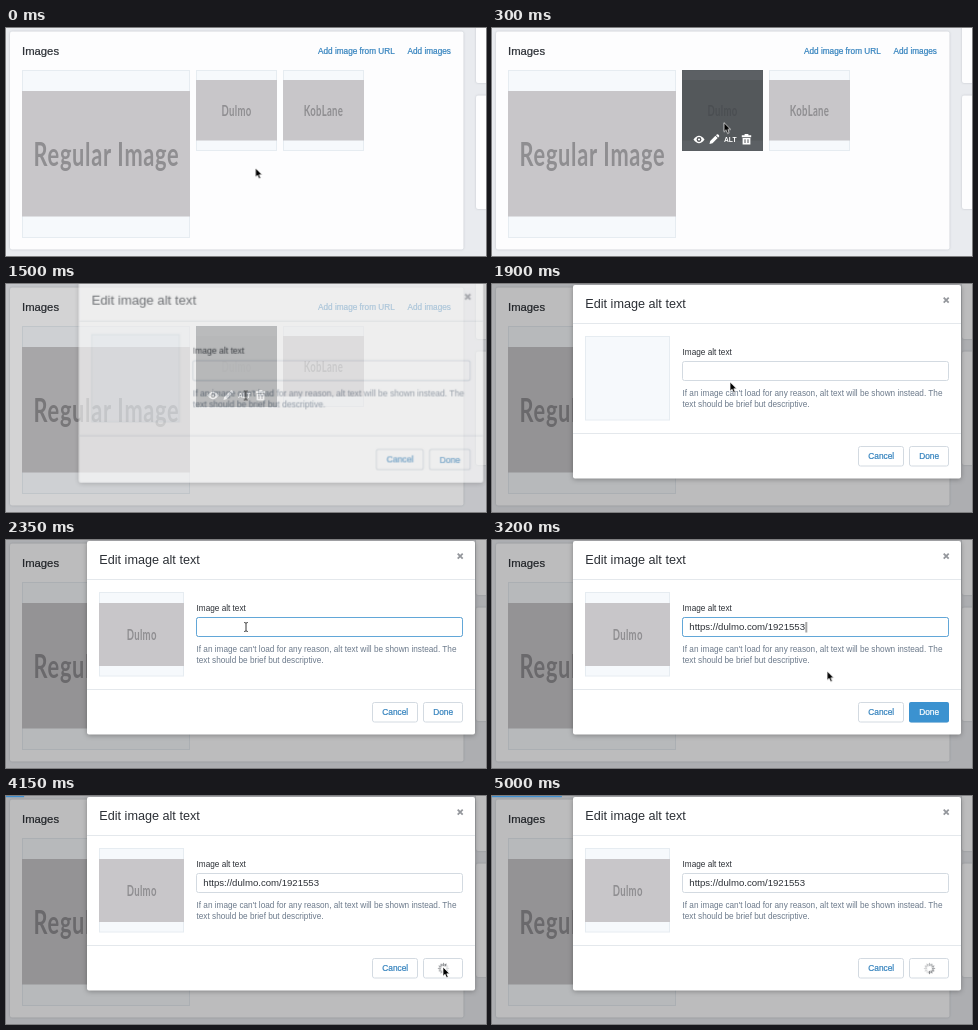
Recreate the animation shown at these times as an HTML page. Size 480 by 228 pixels, loop 5050 ms.

```html
<!DOCTYPE html>
<html lang="en">
<head>
<meta charset="utf-8">
<title>Edit image alt text</title>
<style>
html, body { margin: 0; width: 100%; height: 100%; overflow: hidden; background: #e9ebef; }
svg { display: block; width: 100vw; height: 100vh; }
text { font: 8.23px "Liberation Sans", Arial, sans-serif; fill: #2c3036; }
.link { fill: #3583be; color: #3583be; }
.medium { stroke: currentColor; stroke-width: .22px; }
.card { fill: #fdfdfe; filter: drop-shadow(0 .6px .8px rgba(40, 50, 65, .2)); }
.frame { fill: #f6f9fc; stroke: #e6ecf1; }
.photo { fill: #c8c6c9; }
.sign { font: 700 33px Lato, sans-serif; letter-spacing: .033em; fill: #8f8e91; text-anchor: middle; }
.small { font-size: 14.5px; }
.line { stroke: #e4e8ec; }
.button { fill: #fff; stroke: #d3dae1; }
.action { font-size: 8.3px; }
.help { fill: #6c7a8b; }
.value { font-size: 9.6px; }
.white { fill: #fff; color: #fff; }

/* One shared 5050 ms clock; percentages are ms / 50.5. */
.anim { animation: 5050ms linear infinite; }
.cut { animation: 5050ms step-end infinite; }

#shade { animation-name: shade; }
@keyframes shade { 0%, 2.97% { opacity: 0 } 5.94%, 100% { opacity: 1 } }
#tip { animation-name: tip; }
@keyframes tip { 0%, 14.85% { opacity: 0 } 16.83%, 25.74% { opacity: 1 } 27.72%, 100% { opacity: 0 } }

#dim { animation-name: dim; }
@keyframes dim {
  0% { opacity: 0 }
  27.32% { opacity: 0; animation-timing-function: cubic-bezier(.25, .46, .45, .94) }
  33.66%, 100% { opacity: 1 }
}
#modal { transform-origin: 275px 97.5px; animation-name: modal; }
@keyframes modal {
  0% { opacity: 0; transform: scale(1.11) }
  27.52% { opacity: 0; transform: scale(1.11); animation-timing-function: cubic-bezier(.25, .46, .45, .94) }
  33.66%, 100% { opacity: 1; transform: none }
}
#thumb { animation-name: thumb; }
@keyframes thumb { 0% { opacity: 0 } 38.61%, 100% { opacity: 1 } }
#focus { animation-name: focus; }
@keyframes focus { 0% { opacity: 0 } 40.59% { opacity: 1 } 80.19%, 100% { opacity: 0 } }
#typed { animation-name: typed; }
@keyframes typed { 0% { opacity: 0 } 56.43%, 100% { opacity: 1 } }
#caret { animation-name: caret; }
@keyframes caret {
  0% { opacity: 0; transform: translateX(198px) }
  40.59% { opacity: 1; transform: translateX(198px) }
  45.54% { opacity: 0; transform: translateX(198px) }
  55.44% { opacity: 1; transform: translateX(198px) }
  56.43% { opacity: 1; transform: translateX(314.3px) }
  66.33% { opacity: 0; transform: translateX(314.3px) }
  76.23% { opacity: 1; transform: translateX(314.3px) }
  80.19%, 100% { opacity: 0; transform: translateX(314.3px) }
}
#ready { animation-name: ready; }
@keyframes ready { 0% { opacity: 0 } 56.43% { opacity: 1 } 80.19%, 100% { opacity: 0 } }
#done { animation-name: done; }
@keyframes done { 0% { opacity: 1 } 56.43%, 100% { opacity: 0 } }
#busy { animation-name: busy; }
@keyframes busy { 0% { opacity: 0 } 80.19%, 100% { opacity: 1 } }
#spin { transform-origin: 0 0; animation-name: spin; }
@keyframes spin {
  0% { transform: none }
  80.19% { transform: rotate(0deg); animation-timing-function: steps(20) }
  100% { transform: rotate(600deg) }
}
#bar { animation-name: bar; }
@keyframes bar {
  0%, 80.19% { transform: scaleX(0) }
  82.17% { transform: scaleX(18) }
  89.1% { transform: scaleX(48) }
  100% { transform: scaleX(72) }
}

#cursor { animation-name: move; }
@keyframes move {
  0%, .99% { transform: translate(249.5px, 140px); animation-timing-function: ease-in-out }
  6.93% { transform: translate(231px, 92px) }
  11.88% { transform: translate(231px, 92px); animation-timing-function: ease-in-out }
  16.83%, 24.75% { transform: translate(240.7px, 109px) }
  29.7%, 35.64% { transform: translate(239.7px, 111.5px) }
  37.62% { transform: translate(238px, 98px) }
  40.59%, 57.43% { transform: translate(240px, 87px) }
  63.37% { transform: translate(335px, 131px) }
  65.35% { transform: translate(352px, 139px) }
  66.34% { transform: translate(352px, 139px); animation-timing-function: ease-out }
  71.29%, 84.16% { transform: translate(437px, 171px) }
  87.13%, 100% { transform: translate(441px, 179px) }
}
#arrow { animation-name: arrow; }
@keyframes arrow {
  0% { opacity: 1 } 13.86% { opacity: 0 }
  35.64% { opacity: 1 } 39.6% { opacity: 0 }
  59.4% { opacity: 1 } 71.28% { opacity: 0 }
  81.18% { opacity: 1 } 88.11%, 100% { opacity: 0 }
}
#hand { animation-name: hand; }
@keyframes hand {
  0% { opacity: 0 } 13.86% { opacity: 1 } 28.71% { opacity: 0 }
  71.28% { opacity: 1 } 81.18%, 100% { opacity: 0 }
}
#beam { animation-name: beam; }
@keyframes beam {
  0% { opacity: 0 } 28.71% { opacity: 1 } 35.64% { opacity: 0 }
  39.6% { opacity: 1 } 59.4%, 100% { opacity: 0 }
}
</style>
</head>
<body>
<svg viewBox="0 0 480 228">
  <rect width="480" height="228" fill="#e9ebef"/>
  <rect class="card" x="4" y="3.5" width="453.5" height="218" rx="2"/>
  <rect class="card" x="470" y="-10" width="30" height="65" rx="2"/>
  <rect class="card" x="470" y="67.5" width="30" height="113.5" rx="2"/>

  <text class="medium" x="16" y="27" color="#2c3036" style="font-size:11.3px">Images</text>
  <text class="link medium" x="312" y="26">Add image from URL</text>
  <text class="link medium" x="401.5" y="26">Add images</text>

  <rect class="frame" x="16.5" y="42.5" width="167" height="167"/>
  <rect class="photo" x="16" y="63" width="168" height="125.5"/>
  <text class="sign" transform="translate(100.5 138) scale(.66 1)">Regular Image</text>

  <rect class="frame" x="190.5" y="42.5" width="80" height="80"/>
  <rect class="photo" x="190" y="52" width="81" height="60.5"/>
  <text class="sign small" transform="translate(230.5 88) scale(.66 1)">Dulmo</text>

  <rect class="frame" x="277.5" y="42.5" width="80" height="80"/>
  <rect class="photo" x="277" y="52" width="81" height="60.5"/>
  <text class="sign small" transform="translate(317.5 88) scale(.66 1)">KobLane</text>

  <g id="shade" class="anim">
    <rect x="190" y="42" width="81" height="81" fill="#3d4145" fill-opacity=".83"/>
    <g fill="#fff">
      <path d="M201.5 111.5Q207 104 212.5 111.5Q207 119 201.5 111.5Z"/>
      <circle cx="207" cy="111.5" r="2.4" fill="#55575b"/>
      <circle cx="207" cy="111.5" r="1.1"/>
      <path d="M217.5 116L218.2 113L223.4 107.8L225.7 110.1L220.5 115.3ZM224 107.2L225 106.3Q225.8 106 226.6 106.8T227.2 108.5L226.3 109.5Z"/>
      <text class="white" x="232" y="114" style="font-weight:700;font-size:6.7px">ALT</text>
      <path d="M249.8 107.2H252.6V106H256.4V107.2H259.2V109.2H249.8ZM250.6 110H258.4V116.5H250.6Z"/>
      <path d="M253 111.3V115M256 111.3V115" stroke="#55575b"/>
    </g>
  </g>
  <g id="tip" class="anim">
    <path d="M216 81.5H260.5Q263 81.5 263 84V95Q263 97.5 260.5 97.5H241.5L238.5 100.5L235.5 97.5H216Q213.5 97.5 213.5 95V84Q213.5 81.5 216 81.5Z" fill="#1f2124"/>
    <text class="white medium" x="219" y="92" style="font-size:7.75px">Edit alt text</text>
  </g>

  <rect id="dim" class="anim" width="480" height="228" fill="rgba(0,0,0,.26)"/>

  <g id="modal" class="anim">
    <rect x="81" y="1" width="388" height="193.5" rx="2" fill="#fff" style="filter:drop-shadow(0 1px 2.5px rgba(0,0,0,.3))"/>
    <path class="line" d="M81 39.5H469M81 149.5H469"/>
    <text x="93.3" y="24" style="font-size:12.65px">Edit image alt text</text>
    <path d="M451.7 13.7L456.7 18.7M456.7 13.7L451.7 18.7" stroke="#94979c" stroke-width="1.8"/>

    <rect class="frame" x="93.5" y="52.5" width="84" height="83.5"/>
    <g id="thumb" class="cut">
      <rect class="photo" x="93" y="63" width="85" height="63"/>
      <text class="sign small" transform="translate(135.7 100) scale(.66 1)">Dulmo</text>
    </g>

    <text x="190.5" y="71">Image alt text</text>
    <rect class="button" x="190.5" y="77.5" width="266" height="19" rx="2"/>
    <rect id="focus" class="cut" x="190.5" y="77.5" width="266" height="19" rx="2" fill="none" stroke="#62a7d8"/>
    <text id="typed" class="value cut" x="197.3" y="90.3">https://dulmo.com/1921553</text>
    <path id="caret" class="cut" d="M0 82V92.5" stroke="#222" stroke-width=".8"/>
    <text class="help" x="190.5" y="111.7">If an image can't load for any reason, alt text will be shown instead. The</text>
    <text class="help" x="190.5" y="122.7">text should be brief but descriptive.</text>

    <rect class="button" x="366.5" y="162.5" width="45" height="19.5" rx="2"/>
    <text class="link medium action" x="376.3" y="175.4">Cancel</text>
    <rect class="button" x="417.5" y="162.5" width="39" height="19.5" rx="2"/>
    <text id="done" class="link medium action cut" x="427.2" y="175.4">Done</text>
    <g id="ready" class="cut">
      <rect x="417" y="162" width="40" height="20.5" rx="2" fill="#3b92d0"/>
      <text class="white medium action" x="427.2" y="175.4">Done</text>
    </g>
    <g id="busy" class="cut">
      <g transform="translate(437.5 172.5)"><g id="spin" class="anim"></g></g>
    </g>
  </g>

  <rect id="bar" class="anim" width="1" height="1.2" fill="#3f8fd0"/>

  <g id="cursor" class="anim">
    <path id="arrow" class="cut" d="M0 0V9.2L2.1 7.3L3.6 10.8L5.2 10.1L3.8 6.8H6.6Z" stroke="#fff" stroke-width=".7"/>
    <path id="hand" class="cut" d="M-.9 .5C-.9 -.8 .9 -.8 .9 .5V4.2C2 3.6 3 4 3 4.6C4 4.2 4.8 4.6 4.9 5.2C6 5 6.3 5.6 6.3 6.2V8.5C6.3 9.5 5.5 10 5.5 11H-.2C-.3 10-2 9-2.8 7.2C-3.4 5.9-2 5.4-.9 7Z" fill="#fff" stroke="#111" stroke-width=".8"/>
    <path id="beam" class="cut" d="M-1.8 -4.5Q0 -4.5 0 -3.5Q0 -4.5 1.8 -4.5M0 -3.5V3.5M-1.8 4.5Q0 4.5 0 3.5Q0 4.5 1.8 4.5" fill="none" stroke="#222" stroke-width=".9"/>
  </g>
</svg>
<script>
// Twelve spokes, fading around the circle.
const spin = document.getElementById("spin");
for (let i = 0; i < 12; i++) {
  const spoke = document.createElementNS(spin.namespaceURI, "path");
  spoke.setAttribute("d", "M0 -2.8V-5.2");
  spoke.setAttribute("stroke", "#30343a");
  spoke.setAttribute("stroke-opacity", 0.25 + 0.75 * i / 11);
  spoke.setAttribute("transform", `rotate(${i * 30})`);
  spin.append(spoke);
}
</script>
</body>
</html>
```
